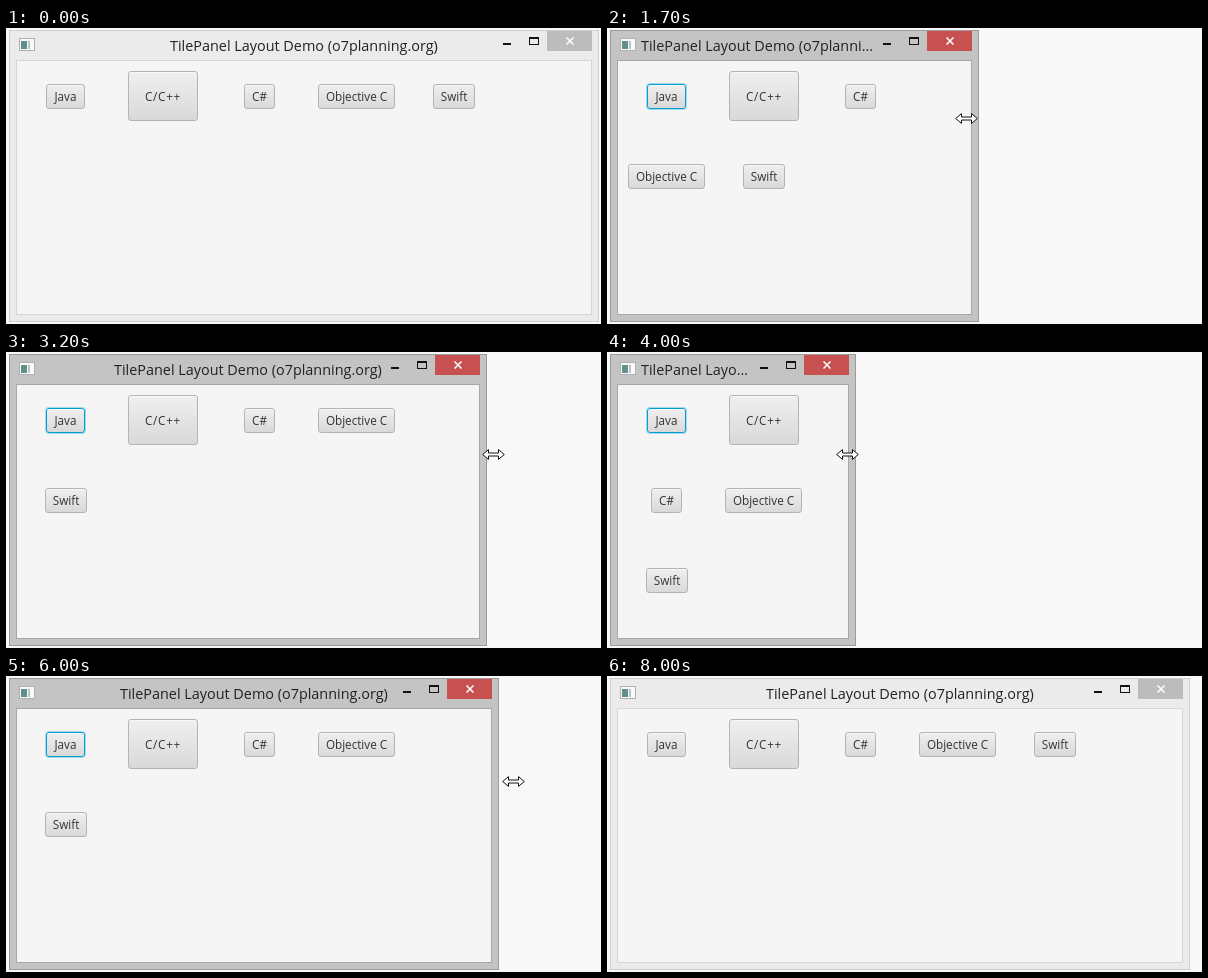
An HTML page that plays this animation: 595 px wide and 296 px high, repeating every 8.2 s.

```html
<!DOCTYPE html>
<html lang="en">
<head>
<meta charset="utf-8">
<title>TilePanel Layout Demo</title>
<style>
html, body { margin: 0; width: 100%; height: 100%; overflow: hidden; background: #f8f8f8; }
#stage { position: relative; width: 595px; height: 296px; overflow: hidden;
  background: #f8f8f8; font-family: "Open Sans", "Noto Sans", sans-serif; }
#stage * { position: absolute; box-sizing: border-box; }
#win { left: 3px; top: 2px; height: 292px; background: #ebebeb; border: 1px solid #d0d0d0;
  --line: #d6d6d6; --close: #bcbcbc; }
#win.on { background: #c4c4c4; border-color: #9b9b9b; --line: #a8a8a8; --close: #c75050; }
#icon { left: 9px; top: 7px; }
#title { top: 4px; height: 22px; line-height: 22px; font-size: 14.4px; color: #222;
  white-space: pre; overflow: hidden; text-overflow: ellipsis; }
#min { right: 87px; top: 12px; width: 8px; height: 2px; background: #111; }
#max { right: 59px; top: 6px; width: 10px; height: 8px; border: 1px solid #111; border-top-width: 2px; }
#close { right: 6px; top: 0; width: 45px; height: 20px; background: var(--close); }
#close svg { left: 19px; top: 6px; }
#pane { left: 6px; right: 6px; top: 29px; bottom: 6px; overflow: hidden;
  background: #f5f5f5; border: 1px solid var(--line); }
.btn { display: flex; align-items: center; justify-content: center; height: 25px; padding-bottom: 1px;
  font-size: 11.7px; color: #333; white-space: pre; border: 1px solid #b4b4b4; border-radius: 3px;
  background: linear-gradient(#efefef, #d9d9d9); box-shadow: inset 0 1px #f8f8f8; }
.btn.tall { height: 50px; padding: 0; letter-spacing: .7px; }
.on .btn.focus { border-color: #039ed3; box-shadow: 0 0 0 1px #039ed355, inset 0 1px #f8f8f8; }
#cursor path { fill: #fff; stroke: #111; }
#pointer { left: 594px; top: 69px; width: 1px; height: 17px; background: #111; }
</style>
</head>
<body>
<div id="stage">
  <div id="win">
    <svg id="icon" width="16" height="13">
      <rect x=".5" y=".5" width="15" height="12" fill="#fafafa" stroke="#b0b0b0"/>
      <rect x="2" y="3" width="6" height="8" fill="#5f918a"/>
      <rect x="9" y="3" width="2" height="8" fill="#b4c6c5"/>
    </svg>
    <div id="title">TilePanel Layout Demo (o7planning.org)</div>
    <div id="min"></div>
    <div id="max"></div>
    <div id="close"><svg width="8" height="8"><path d="M.5.5 7.5 7.5M7.5.5.5 7.5" stroke="#fff" stroke-width="1.5"/></svg></div>
    <div id="pane"></div>
  </div>
  <div id="pointer"></div>
  <svg id="cursor" width="23" height="11"><path d="M.7 5.5 6.5.6V4H16.5V.6L22.3 5.5 16.5 10.4V7H6.5V10.4Z"/></svg>
</div>
<script>
const LOOP = 8200, STEP = 100;
const LEFT = 3, TITLE_LEFT = 34, START = 593;
const LEAD = 45; // the window edge trails the cursor by this many ms
const TILE = { w: 77, h: 50, hgap: 20, vgap: 30, pad: 10 };

const clamp = u => Math.max(0, Math.min(1, u));
const smooth = u => u * u * (3 - 2 * u);
const glide = u => .7 * smooth(u) + .3 * u;
const brake = u => 1 - (1 - u) ** 2;
const part = (t, from, to) => clamp((t - from) / (to - from));

const DRAGS = [
  { from: 800, to: 2210, edge: 270, ease: glide },
  { from: 2430, to: 3300, edge: 494, ease: glide },
  { from: 3400, to: 4300, edge: 218, ease: brake },
  { from: 4300, to: 4700, edge: 202, ease: brake },
  { from: 4900, to: 5870, edge: 442, ease: glide },
  { from: 5870, to: 6400, edge: 561, ease: brake },
  { from: 6800, to: 7370, edge: 583, ease: brake }
];

const edgeAt = t => DRAGS.reduce((x, d) => x + (d.edge - x) * d.ease(part(t, d.from, d.to)), START);
const cursorY = t => 71 + 31 * smooth(part(t, 700, 2400)) + 9.5 * smooth(part(t, 5300, 6900));

const $ = id => document.getElementById(id);
const win = $('win'), title = $('title'), cursor = $('cursor'), pointer = $('pointer');
const titleWidth = title.getBoundingClientRect().width;

const buttons = [['Java', 39], ['C/C++', 70], ['C#', 31], ['Objective C', 77], ['Swift', 42]].map(([text, w], i) => {
  const el = document.createElement('div');
  el.className = 'btn' + (i === 0 ? ' focus' : i === 1 ? ' tall' : '');
  el.textContent = text;
  el.style.width = w + 'px';
  $('pane').append(el);
  return { el, w, h: i === 1 ? TILE.h : 25 };
});

function layTiles(right) {
  const room = right - 19 - 2 * TILE.pad;
  const cols = Math.max(1, Math.floor((room + TILE.hgap) / (TILE.w + TILE.hgap)));
  buttons.forEach(({ el, w, h }, i) => {
    const x = TILE.pad + (i % cols) * (TILE.w + TILE.hgap) + (TILE.w - w) / 2;
    const y = TILE.pad + Math.floor(i / cols) * (TILE.h + TILE.vgap) + (TILE.h - h) / 2;
    el.style.left = Math.ceil(x) + 'px';
    el.style.top = Math.ceil(y) + 'px';
  });
}

function layTitle(right) {
  const limit = right - 102;
  const centred = (LEFT + right - titleWidth) / 2;
  const x = Math.max(TITLE_LEFT, Math.min(centred, limit - titleWidth));
  title.style.left = Math.floor(x) - LEFT - 1 + 'px';
  title.style.width = Math.min(titleWidth + 1, limit - x) + 'px';
}

function draw(now) {
  const t = Math.floor(now % LOOP / STEP) * STEP;
  const right = Math.round(edgeAt(t));
  win.className = t >= 900 && t < 8000 ? 'on' : '';
  win.style.width = right - LEFT + 'px';
  layTiles(right);
  layTitle(right);
  pointer.hidden = t < 400 || t >= 600;
  cursor.style.display = t >= 600 && t < 7600 ? 'block' : 'none';
  cursor.style.left = Math.round(edgeAt(t + LEAD) - 11.5) + 'px';
  cursor.style.top = Math.round(cursorY(t) - 5.5) + 'px';
}

const start = performance.now();
function tick() {
  draw(performance.now() - start);
  requestAnimationFrame(tick);
}
tick();
</script>
</body>
</html>
```
